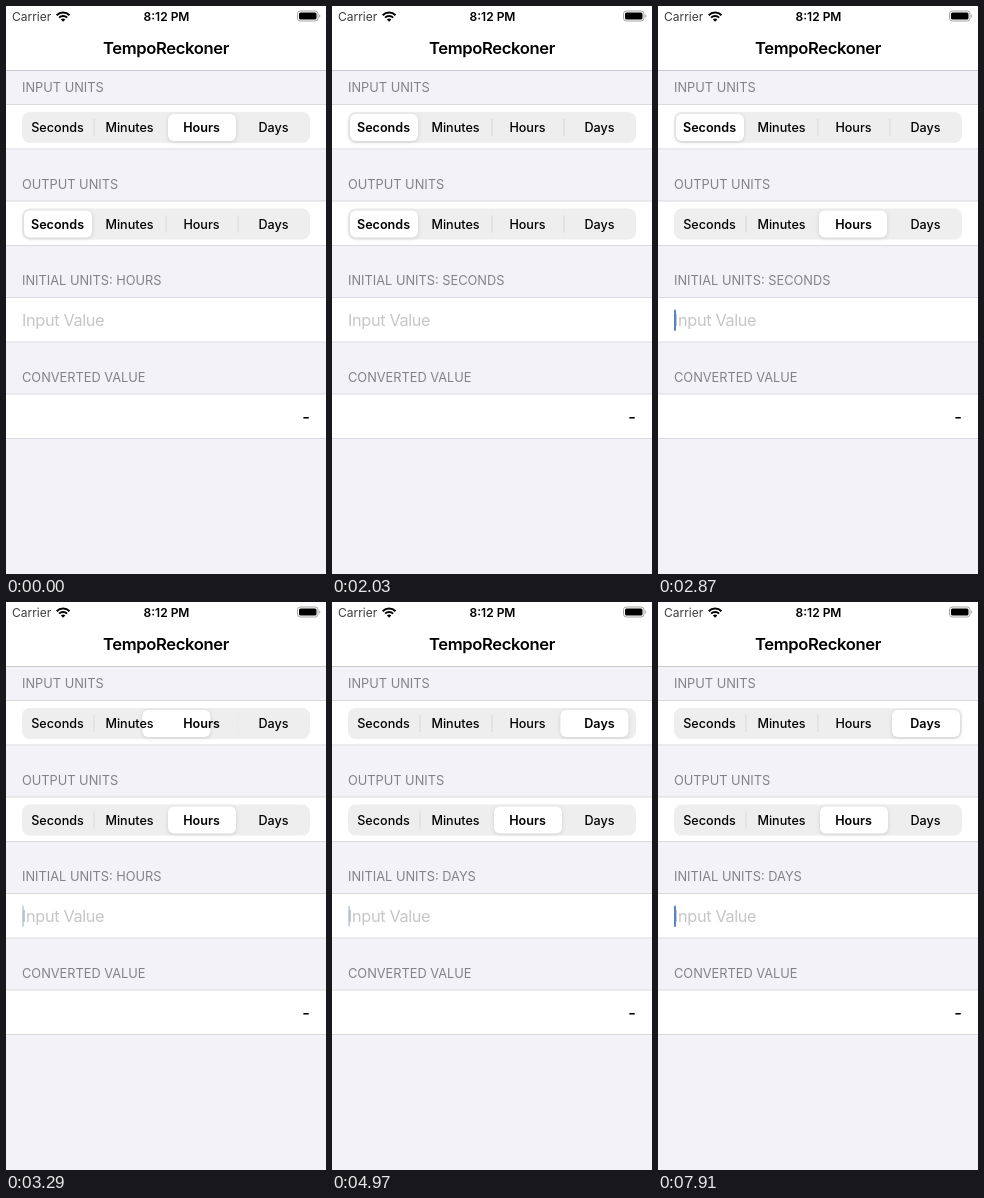
These frames come from a looping animation (320 by 568 pixels, 8000 ms). An HTML page:

```html
<!DOCTYPE html>
<html lang="en">
<head>
<meta charset="utf-8">
<title>TempoReckoner</title>
<style>
  html, body { margin: 0; width: 100%; height: 100%; overflow: hidden; background: #f3f2f8; }
  svg { display: block; width: 320px; height: 568px; font-family: Inter, Roboto, sans-serif; }
  .title { font-size: 16.6px; font-weight: 600; letter-spacing: -.35px; text-anchor: middle; }
  .carrier { font-size: 12px; fill: #3c3c3e; }
  .clock { font-size: 12px; font-weight: 600; text-anchor: middle; }
  .head { font-size: 12.8px; fill: #828287; }
  .label { font-size: 12.6px; font-weight: 500; text-anchor: middle; }
  .label.on { font-weight: 600; }
  .hint { font-size: 16.3px; letter-spacing: -.35px; fill: #c6c6c8; }
  .value { font-size: 16.5px; font-weight: 500; text-anchor: end; }
  .thumb { fill: #fff; filter: drop-shadow(0 1.5px 2px rgba(0, 0, 0, .13)); }
</style>
</head>
<body>
<svg viewBox="0 0 320 568">
  <rect width="320" height="568" fill="#f3f2f8"/>
  <rect width="320" height="64" fill="#fff"/>
  <rect y="64" width="320" height="1" fill="#c9c9cd"/>

  <text class="carrier" x="6" y="14.5">Carrier</text>
  <g fill="none" stroke="#000" stroke-width="2">
    <path d="M50.7 9.2a9 9 0 0 1 12.8 0M53.1 11.6a5.7 5.7 0 0 1 8 0"/>
    <path d="M57.1 15.8l-2.2-2.3a3.2 3.2 0 0 1 4.4 0z" fill="#000" stroke="none"/>
  </g>
  <text class="clock" x="160.5" y="14.5">8:12 PM</text>
  <rect x="291.5" y="5" width="20.5" height="10" rx="2.8" fill="none" stroke="#a5a5a7"/>
  <rect x="293" y="6.5" width="17.5" height="7" rx="1.5"/>
  <path d="M313.2 8.2a2 2 0 0 1 0 3.6z" fill="#a5a5a7"/>
  <text class="title" x="160" y="48">TempoReckoner</text>

  <g id="rows"></g>
  <text class="head" x="16" y="86">INPUT UNITS</text>
  <text class="head" x="16" y="182.5">OUTPUT UNITS</text>
  <text class="head" x="16" y="279" id="initial"></text>
  <text class="head" x="16" y="375.5">CONVERTED VALUE</text>
  <text class="hint" x="16" y="320">Input Value</text>
  <text class="value" x="304" y="417">-</text>
  <rect id="cursor" x="16" y="303.5" width="2" height="21.5" rx="1" fill="#5a82c4"/>
</svg>
<script>
const LOOP = 8000, STEP = 70, SPRING = 0.03;
const UNITS = ['Seconds', 'Minutes', 'Hours', 'Days'];

// Taps: [time, selected unit]
const INPUT_TAPS = [[-1000, 2], [1330, 1], [1680, 0], [3185, 2], [4830, 3]];
const OUTPUT_TAPS = [[-1000, 0], [2170, 1], [2660, 2]];

// Cursor fades: [time of first step, steps, final opacity]
const FADES = [
  [70, 3, 1], [770, 3, 0], [1190, 2, 1], [1820, 3, 0],
  [2240, 3, 1], [2940, 2, 0], [3290, 3, 1], [3850, 4, 0],
  [4340, 2, 1], [4900, 3, 0], [5390, 2, 1], [6090, 2, 0],
  [6440, 3, 1], [7070, 3, 0], [7490, 2, 1]
];

const rows = document.getElementById('rows');
const initial = document.getElementById('initial');
const cursor = document.getElementById('cursor');

function add(parent, tag, attrs, text = '') {
  const node = document.createElementNS('http://www.w3.org/2000/svg', tag);
  for (const key in attrs) node.setAttribute(key, attrs[key]);
  node.textContent = text;
  return parent.appendChild(node);
}

function addRow(y) {
  add(rows, 'rect', { y, width: 320, height: 45, fill: '#fff' });
  for (const edge of [y - 0.5, y + 44]) {
    add(rows, 'rect', { y: edge, width: 320, height: 1, fill: '#dadade' });
  }
}

function addSegments(y) {
  const group = add(rows, 'g', { transform: `translate(16 ${y})` });
  add(group, 'rect', { width: 288, height: 31, rx: 7.5, fill: '#eeeeef' });
  const bars = [1, 2, 3].map(i =>
    add(group, 'rect', { x: 72 * i - 0.5, y: 7, width: 1, height: 17, fill: '#d5d5d8' }));
  const thumb = add(group, 'rect', { class: 'thumb', y: 2, width: 68, height: 27, rx: 6 });
  const labels = UNITS.map((unit, i) =>
    add(group, 'text', { class: 'label', x: 72 * i + 35.5, y: 20 }, unit));
  return { bars, thumb, labels };
}

for (let i = 0; i < 4; i++) addRow(98.5 + 96.5 * i);
const inputSegments = addSegments(106);
const outputSegments = addSegments(202.5);

function selection(taps, t) {
  const index = taps.findLastIndex(([start]) => start <= t);
  const [start, to] = taps[index];
  const from = index ? taps[index - 1][1] : to;
  const x = (t - start) * SPRING;
  return { from, to, progress: 1 - (1 + x) * Math.exp(-x) };
}

function drawSegments({ bars, thumb, labels }, { from, to, progress }) {
  const mix = (a, b) => a + (b - a) * progress;
  const barShown = (bar, unit) => (unit === bar || unit === bar + 1 ? 0 : 1);
  thumb.setAttribute('x', 2 + 72 * mix(from, to));
  bars.forEach((bar, i) => bar.setAttribute('opacity', mix(barShown(i, from), barShown(i, to))));
  labels.forEach((label, i) => label.classList.toggle('on', i === to));
}

function cursorOpacity(t) {
  const fade = FADES.findLast(([start]) => start <= t);
  if (!fade) return 0;
  const [start, steps, end] = fade;
  const done = Math.min(1, (t - start + STEP) / (steps * STEP));
  return end ? done : 1 - done;
}

function draw(t) {
  const input = selection(INPUT_TAPS, t);
  drawSegments(inputSegments, input);
  drawSegments(outputSegments, selection(OUTPUT_TAPS, t));
  initial.textContent = 'INITIAL UNITS: ' + UNITS[input.to].toUpperCase();
  cursor.setAttribute('opacity', cursorOpacity(t));
}

const begin = performance.now();
function tick() {
  const t = (performance.now() - begin) % LOOP;
  draw(Math.floor(t / STEP) * STEP);
  requestAnimationFrame(tick);
}
tick();
</script>
</body>
</html>
```
